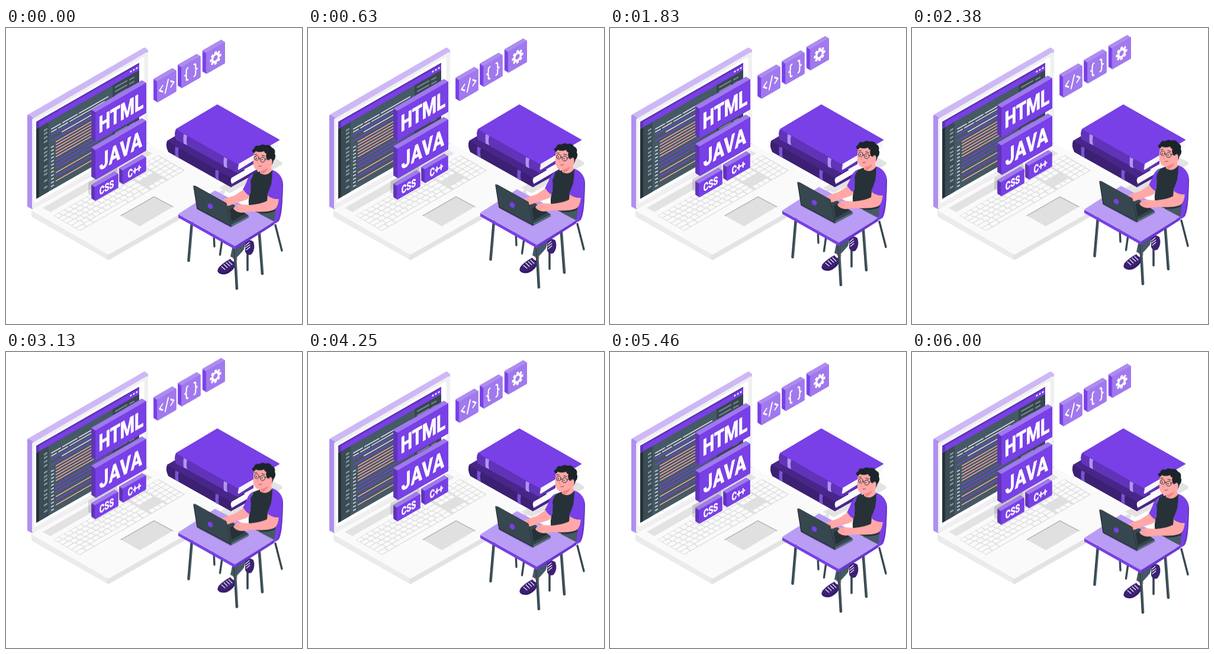
Write an HTML page that moves like this. It is 500 px wide and 500 px high and loops after 6040 ms.

```html
<!DOCTYPE html>
<html lang="en">
<head>
<meta charset="utf-8">
<title>Isometric coding scene</title>
<style>
  html, body { margin: 0; width: 100%; height: 100%; overflow: hidden; background: #fff; }
  svg { display: block; width: 100vw; height: 100vh; }
  .float { animation: float 6040ms linear infinite; }
  @keyframes float { 50% { transform: translateY(-10px); } }
  .round { stroke-linejoin: round; stroke-linecap: round; }
  .line { fill: none; stroke-linejoin: round; stroke-linecap: round; }
  .label {
    font-family: Roboto, "Liberation Sans", sans-serif; font-weight: 700; text-anchor: middle;
    fill: #fff; stroke: #fff; stroke-width: .03em; stroke-linejoin: round;
  }
</style>
</head>
<body>
<svg viewBox="0 0 500 500">
  <!-- laptop base -->
  <g class="round">
    <path d="M46 308V317L173 389L367 278V270Z" fill="#ebebeb" stroke="#ebebeb" stroke-width="6"/>
    <path d="M173 382V389L367 278V270Z" fill="#e3e3e3" stroke="#e3e3e3" stroke-width="5"/>
    <path d="M46 307L240 197L367 270L173 380Z" fill="#fafafa" stroke="#fafafa" stroke-width="5"/>
  </g>
  <path d="M62 304L235 205L247 212L75 311Z" fill="#e3e3e3"/>
  <g id="keys" transform="matrix(.866 -.5 .866 .5 80 317)">
    <rect width="205" height="52" rx="2" fill="#e0e0e0"/>
  </g>
  <path d="M194 317L250 285L282 302L226 335Z" fill="#e0e0e0"/>
  <path d="M194 317L250 285L282 302" class="line" stroke="#a9a9a9" stroke-width="1.3"/>

  <!-- lid -->
  <g class="round">
    <path d="M38 148L234 35L238 38V194L44 304L38 301Z" fill="#cdb8f5" stroke="#cdb8f5" stroke-width="4"/>
    <path d="M38 149L44 153V303L38 300Z" fill="#ae8ff0" stroke="#ae8ff0" stroke-width="4"/>
    <path d="M46 155L238 43V193L46 303Z" fill="#f0f0f0" stroke="#f0f0f0" stroke-width="4"/>
    <path d="M49 158L232 51V189L49 294Z" fill="#fff" stroke="#fff" stroke-width="3"/>
  </g>
  <g id="screen" transform="matrix(1 -.572 0 1 52 166)">
    <rect x="-1" y="-8" width="174" height="130" fill="#455a64"/>
    <rect x="4" width="16" height="122" fill="#3b4c55"/>
    <rect x="128" width="45" height="122" fill="#37474f"/>
    <rect x="-1" y="-2" width="5" height="124" fill="#263238"/>
    <rect x="-1" y="-8" width="174" height="12" fill="#7840e6"/>
    <path d="M-1 -8H173V-5H4V4L-1 2Z" fill="#6033b8"/>
    <g fill="#fff"><circle cx="159" cy="-1.500" r="1.5"/><circle cx="164" cy="-1.500" r="1.5"/><circle cx="169" cy="-1.500" r="1.5"/></g>
  </g>

  <!-- books -->
  <path d="M360 270L378 279L466 231Q468 228 465 226L453 219Z" fill="#e3e3e3"/>
  <g class="round">
    <path d="M273 191L292 180L402 240L380 253V268L275 209Q270 199 273 191Z" fill="#3c2073" stroke="#3c2073" stroke-width="2"/>
    <path d="M273 191L292 180L402 240L380 253Z" fill="#482689"/>
    <path d="M381 253L425 228V240L382 264Q378 258 381 253Z" fill="#fafafa"/>
    <path d="M379 263L380 269L425 244V238L382 263Z" fill="#482689"/>
    <path d="M286 200L292 203Q290 210 292 219L286 216Q285 207 286 200ZM354 239L360 242Q358 249 360 258L354 255Q353 246 354 239Z" fill="#7c52d6"/>
    <path d="M392 230L461 190V202L392 243Z" fill="#f7f7f7"/>
    <path d="M288 171L357 130L461 189L392 229V231L390 243L288 187Q284 179 288 171Z" fill="#7840e6" stroke="#7840e6" stroke-width="2"/>
    <path d="M288 172L392 231Q388 237 390 244L288 187Q284 179 288 172Z" fill="#6033b8" stroke="#6033b8"/>
    <path d="M390 240L391 245L418 230V224L394 239Z" fill="#6033b8"/>
    <path d="M300 179L306 182Q304 190 306 198L300 195Q299 187 300 179ZM368 218L374 221Q372 229 374 237L368 234Q367 226 368 218Z" fill="#b393f2"/>
  </g>

  <!-- floating tiles -->
  <g class="float" id="tiles">
    <path d="M139 261L188 233V250L145 283L139 280Z" fill="#000" opacity=".13"/>
  </g>

  <!-- person at the desk -->
  <g class="float">
    <g class="line" stroke="#37474f">
      <path d="M455 333L466 376" stroke-width="3.4"/>
      <path d="M365 358L361.500 383M351 346L352 369" stroke-width="3.4"/>
      <path d="M408 376V409" stroke-width="3.6"/>
    </g>
    <path d="M450 240Q466 246 468 262L467 290Q466 317 461 326Q455 332 447 331L448 300Z" fill="#7840e6"/>
    <path d="M467 264Q467 310 459 326" class="line" stroke="#6033b8" stroke-width="1.4"/>

    <!-- legs and shoes -->
    <path d="M384 391L380 384L390 380L391 392Z" fill="#f79b99"/>
    <path d="M384 362L408 350L402 374Q394 384 387 390L379 386Z" fill="#455a64"/>
    <g fill="#3c2073">
      <path d="M379 390Q367 396 359 405Q355 412 361 415Q371 419 380 411Q388 405 389 394Q384 397 379 390Z"/>
      <path d="M404 362Q411 355 418 361Q422 373 415 382Q408 386 404 378Z"/>
    </g>
    <g class="line" stroke="#fff" stroke-width="1.100">
      <path d="M368 399L374 405M372 396.500L378 402M376 394L382 400M364 403L370 408M405 367L411 362M405 371L412 366M406 375L412 370"/>
    </g>
    <path d="M358 410Q362 416 371 414Q379 411 385 404" class="line" stroke="#2d1266" stroke-width="1.300"/>

    <g class="line" stroke="#37474f" stroke-width="4.600">
      <path d="M314 329L308.500 393M386 368L390 440M428 348L433 415"/>
    </g>
    <g class="line" stroke="#546e7a" stroke-width="1">
      <path d="M315 331L309.500 393M387 370L391 439M429 349L434 414"/>
    </g>

    <!-- torso -->
    <path d="M426 304L455 307L454 324Q447 332 428 320Z" fill="#455a64"/>
    <path d="M418 246Q432 239 449 240Q459 248 456 264Q457 290 455 309Q432 319 411 306Q408 290 413 276L411 262Z" fill="#263238"/>
    <path d="M418 245Q409 250 406 261L400 273Q405 281 411 284Q415 270 413 258Z" fill="#7840e6"/>

    <!-- table -->
    <path d="M291 315L387 368L453 327V332L387 374L291 320Z" fill="#6a37d0"/>
    <path d="M291 315L387 368V374L291 320Z" fill="#7840e6"/>
    <path d="M292 314L353 275L452 327L387 368Z" class="round" fill="#b99cf3" stroke="#b99cf3"/>

    <!-- notebook and arms -->
    <path d="M324 307L379 337L411 320L402 315Z" fill="#8a64d6" opacity=".7"/>
    <path d="M373 299L384 298L410 317V320L380 336Z" fill="#37474f"/>
    <path d="M378 306L387 302L404 314L381 327Z" fill="#263238"/>
    <path d="M379 333L410 317V320L380 336Z" fill="#546e7a"/>
    <path d="M401 273Q406 281 411 283Q411 289 403 291L382 298Q373 303 364 299Q360 296 364 292L371 288L386 283Z" fill="#ffa8a7"/>
    <path d="M365 293L373 291M366 296L374 294" class="line" stroke="#ef8786" stroke-width=".7"/>
    <path d="M317 268Q317 265 320 267L372 296L380 335L323 305Z" fill="#37474f"/>
    <path d="M317 267L323 305L380 335" class="line" stroke="#263238" stroke-width="1.500"/>
    <path d="M320 267L372 296L380 334" class="line" stroke="#263238"/>
    <ellipse cx="345" cy="301" rx="4" ry="5" transform="rotate(-38 345 301)" fill="#7840e6"/>
    <path d="M442 282L461 287Q460 303 453 307Q441 312 416 310L398 312Q388 311 384 305Q386 299 396 298L413 299Q432 297 441 292Z" fill="#ffa8a7"/>
    <path d="M386 304L394 302M388 308L396 305" class="line" stroke="#ef8786" stroke-width=".7"/>
    <path d="M450 240Q464 244 466 260Q467 275 462 289Q449 290 441 282Q445 273 448 264Q450 252 450 240Z" fill="#7840e6"/>

    <!-- head -->
    <path d="M429 236L446 228L449 241Q440 252 429 245Z" fill="#ffa8a7"/>
    <path d="M430 241Q439 239 444 233Q442 243 432 247Z" fill="#f08583"/>
    <path d="M419 209Q417 222 418 231Q420 239 425 241Q433 242 439 238L448 234Q453 229 450 221L444 205L426 204Z" fill="#ffa8a7"/>
    <path d="M418 211Q413 206 419 204Q421 197 428 199Q433 195 438 198Q446 196 449 202Q456 205 454 212Q457 219 452 224Q451 229 449 231Q451 224 448 221Q445 220 443 224L441 222Q438 217 440 212Q437 212 436 208Q428 211 422 208Q420 212 418 211Z" fill="#1b2429"/>
    <g class="line" stroke="#263238">
      <circle cx="423.500" cy="219.500" r="3.800"/>
      <circle cx="433.500" cy="222.500" r="4.200"/>
      <path d="M438 221L446 222M427 220.500L429.500 221M420 213.500L424 213M432 215L437 216.500" stroke-width="1.200"/>
    </g>
    <circle cx="423" cy="220" r="1" fill="#263238"/>
    <circle cx="432.500" cy="222.500" r="1" fill="#263238"/>
    <path d="M426 222L424 228L427 229" class="line" stroke="#ef8786" stroke-width=".8"/>
    <path d="M427 233.500Q430 234.500 432 232.500" class="line" stroke="#7a3030" stroke-width=".8"/>
  </g>
</svg>
<script>
  const SLOPE = 0.577;
  const add = (id, markup) => document.getElementById(id).insertAdjacentHTML('beforeend', markup);

  // Keyboard: a main block, a navigation block and a number pad
  const key = (x, y, w) => `<rect x="${x}" y="${y}" width="${w}" height="6.900" rx="1.200" fill="#fafafa"/>`;
  let keys = '';
  for (let row = 0; row < 6; row++) {
    const y = 1 + row * 8.5;
    if (row === 5) {
      [1, 15, 97, 111, 125].forEach(x => keys += key(x, y, 12));
      keys += key(29, y, 66);
    } else {
      const first = 8 + row * 2;
      keys += key(1, y, first);
      let x = first + 2.8;
      for (; x + 10 < 127; x += 10.8) keys += key(x, y, 9);
      keys += key(x, y, 137 - x);
    }
    if (row < 3 || row === 5) [142, 151.5, 161].forEach(x => keys += key(x, y, 8));
    [173, 183.5, 194].forEach(x => keys += key(x, y, 9));
  }
  add('keys', keys);

  // Editor contents, in screen coordinates
  const bar = (x, y, w, color, h = 1.7) =>
    `<rect x="${x}" y="${y}" width="${w}" height="${h}" rx=".7" fill="${color}"/>`;
  const white = '#e8e4f4', pink = '#ffa8a7', violet = '#7840e6';
  let code = '';
  [13, 19, 26, 33, 44, 51, 57, 64, 75, 82, 88, 99, 110].forEach(y => code += bar(12, y, 6, '#8496a0', 3));
  code += bar(24, 18, 17, white) + bar(43, 18, 26, white) + bar(71, 18, 50, white);
  code += bar(24, 23, 10, white) + bar(36, 23, 17, white) + bar(55, 23, 60, white);
  code += bar(24, 28, 95, violet) + bar(42, 33, 76, white) + bar(24, 38, 94, violet);
  [44, 49, 54, 59, 64, 69].forEach(y => code += bar(32, y, 86, pink));
  [76, 82, 88].forEach(y => code += bar(32, y, 86, violet));
  [96, 102].forEach((y, i) => code += bar(32, y, 86, i ? violet : pink));
  code += bar(32, 110, 86, pink);
  for (let y = 49; y < 118; y += 6) code += bar(24, y, 5, white);
  for (let y = 9; y < 118; y += 7) {
    code += bar(132, y, 21, '#78858d', 2.5) + bar(156, y + 1, 9, '#78858d', 2.5);
  }
  add('screen', code);

  // Extruded tile; (x, y) is the upper left corner of its front face
  const strong = { front: '#7840e6', top: '#a179ee', side: '#6033b8' };
  const soft = { front: '#a179ee', top: '#ae8cf0', side: '#7840e6' };
  const poly = (pts, color, w) =>
    `<polygon class="round" points="${pts.join(' ')}" fill="${color}" stroke="${color}" stroke-width="${w}"/>`;

  function tile(x, y, w, h, d, tone, content) {
    const r = w * SLOPE, e = d * 0.62;
    const tl = [x, y], tr = [x + w, y - r], br = [x + w, y - r + h], bl = [x, y + h];
    const backL = [x - d, y - e], backR = [x + w - d, y - r - e], lowL = [x - d, y + h - e];
    const shell = [backL, backR, tr, br, bl, lowL];
    return poly(shell, tone.side, 1) + poly([backL, backR, tr, tl], tone.top, 1) +
      poly([tl, tr, br, bl], tone.front, 1) +
      `<g transform="translate(${x + w / 2} ${y - r / 2 + h / 2})">${content}</g>`;
  }

  const label = (text, size, gap = 0) =>
    `<text class="label" transform="matrix(.73 -.421 0 1 0 0)" y="${size * 0.355}" font-size="${size}" letter-spacing="${gap}">${text}</text>`;
  const icon = d =>
    `<path class="line" transform="matrix(.866 -.5 0 1 0 0)" d="${d}" stroke="#fff" stroke-width="2.500"/>`;

  function gear() {
    let teeth = '';
    for (let a = 0; a < 360; a += 45) {
      teeth += `<rect x="-2.300" y="-11" width="4.600" height="6" rx="1" transform="rotate(${a})" fill="#fff"/>`;
    }
    return `<g transform="matrix(.866 -.5 0 1 0 0)">${teeth}<circle r="6.200" fill="none" stroke="#fff" stroke-width="4"/></g>`;
  }

  add('tiles',
    tile(198, 240.5, 38, 23, 6, strong, label('C++', 18)) +
    tile(151, 268.5, 38, 23, 6, strong, label('CSS', 18)) +
    tile(152, 206, 84.5, 49.5, 7, strong, label('JAVA', 38, 1.5)) +
    tile(152, 142, 84.5, 50, 7, strong, label('HTML', 38)) +
    tile(256, 90, 31, 35, 6, soft, icon('M-8 -5L-14 0L-8 5M8 -5L14 0L8 5M3 -10L-3 10')) +
    tile(297, 66, 31, 35, 6, soft,
      icon('M-6 -10Q-9 -10 -9 -7V-3Q-9 0 -12 0Q-9 0 -9 3V7Q-9 10 -6 10M6 -10Q9 -10 9 -7V-3Q9 0 12 0Q9 0 9 3V7Q9 10 6 10')) +
    tile(338.5, 42, 31, 35, 6, soft, gear()));
</script>
</body>
</html>
```
